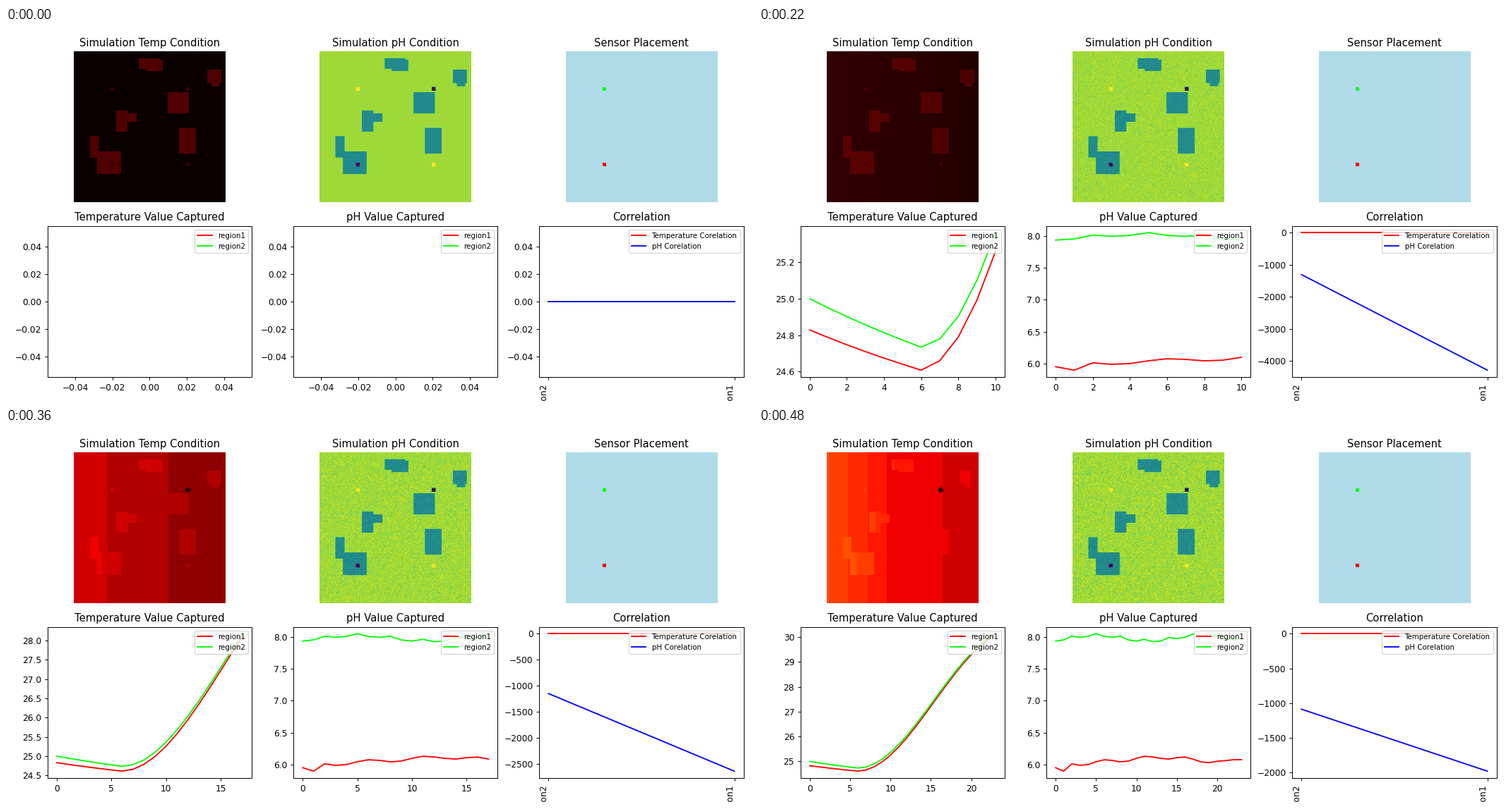
Write a matplotlib script that moves like this. It is 1058 by 529 pixels and loops after 500 ms.

```python
import numpy as np
import matplotlib.pyplot as plt
from matplotlib.animation import FuncAnimation

W, H = 1058, 529
STEPS, N = 25, 200
AIR, KEEP = 24, 0.95
hours = np.arange(STEPS)

# Disturbed areas: x0, x1, y0, y1 in cells
PATCHES = [(86, 113, 10, 24), (95, 117, 12, 27), (176, 194, 25, 43),
           (181, 192, 43, 47), (124, 152, 55, 83), (56, 71, 79, 107),
           (71, 83, 83, 94), (139, 161, 102, 136), (21, 33, 113, 141),
           (31, 62, 133, 163)]


def dot(x, y):
    return np.s_[y - 2:y + 3, x - 2:x + 3]


def wave(period, peak):
    return np.cos(2 * np.pi * (hours - peak) / period)


def solar_rise():
    """Warming above the air base at full exposure, one value per step."""
    sun = 14 * np.sin(np.pi * np.maximum(hours - 6, 0) / 24)
    rise = [0.0]
    for s in sun[1:]:
        rise.append(KEEP * rise[-1] + (1 - KEEP) * s)
    return np.array(rise)


RISE = solar_rise()
DECAY = KEEP ** hours
TEMP1 = AIR + 0.828 * DECAY + 0.9 * RISE
TEMP2 = AIR + 0.9985 * DECAY + 0.9 * RISE

PH1 = np.interp(hours, [0, 1, 2, 13, 21, 23],
                [5.94, 5.865, 6.0, 6.12, 6.03, 6.1]) + 0.03 * wave(5, 1)
PH2 = 7.982 + 0.045 * wave(13, 5) + 0.025 * wave(3, 2)

excess = np.zeros((N, N))
acid = np.full((N, N), 6 / 7)
for x0, x1, y0, y1 in PATCHES:
    excess[y0:y1, x0:x1] = 1.5
    acid[y0:y1, x0:x1] = 0.48
for x in (50, 150):
    for y in (50, 150):
        excess[dot(x, y)] = 1
        acid[dot(x, y)] = x == y

exposure = 1 - 0.4 * np.arange(N) / N
yy, xx = np.mgrid[:N, :N]
sink = np.exp(-(np.hypot(xx - 150, yy - 50) / 3.5) ** 4)

rng = np.random.default_rng(4)
drift = rng.normal(0, 0.0095, (STEPS, N, N))
drift[0] = 0
noise = np.cumsum(drift, axis=0)


def heat_image(k):
    """Hot colours: smooth dark reds, then bands of red and of orange."""
    n = max(k - 1, 0)
    above = excess * DECAY[n] + RISE[n] * exposure
    if k:
        above = above * (1 - sink)
    s = 10 + 47.8 * above
    red = 112 + 32 * np.clip((s - 94.7) // 32.6, 0, 4)
    orange = 276 + 20 * ((s - 271) // 15.6)
    tone = np.select([s < 94.7, s < 271], [s, red], orange)
    rgb = np.zeros((N, N, 3), np.uint8)
    rgb[..., 0] = np.minimum(tone, 255)
    rgb[..., 1] = np.maximum(tone - 255, 0)
    return rgb


def correlation(k):
    if k == 0:
        return 0, 0
    return -900 - 4500 / k, -47500 * (1 - np.exp(-k / 2.2)) / k


fig = plt.figure(figsize=(12, 6), dpi=W / 12, facecolor="white")


def panel(col, top):
    left, w, h = 58.7 + 348.25 * col, 289.5, 214.5
    return fig.add_axes((left / W, 1 - (top + h) / H, w / W, h / H))


maps = [panel(c, 33.0) for c in range(3)]
temp_ax, ph_ax, corr_ax = [panel(c, 280.5) for c in range(3)]

for ax, title in zip(maps, ("Simulation Temp Condition",
                            "Simulation pH Condition", "Sensor Placement")):
    ax.set_title(title)
    ax.axis("off")

sensors = np.full((N, N, 3), (175, 219, 232), np.uint8)
sensors[dot(50, 50)] = (0, 255, 0)
sensors[dot(50, 150)] = (255, 0, 0)

heat = maps[0].imshow(heat_image(0), interpolation="nearest")
ph = maps[1].imshow(acid, cmap="viridis", vmin=0, vmax=1)
maps[2].imshow(sensors, interpolation="nearest")


def chart(ax, title, lines):
    ax.cla()
    for xs, ys, color, label in lines:
        ax.plot(xs, ys, color=color, label=label)
    ax.set_title(title)
    ax.legend(loc="upper right", fontsize="small")


def regions(ax, title, first, second, k):
    chart(ax, title, [(hours[:k], first[:k], "red", "region1"),
                      (hours[:k], second[:k], "lime", "region2")])


def update(k):
    heat.set_data(heat_image(k))
    ph.set_data(np.clip(acid + noise[k], 0, 1))
    regions(temp_ax, "Temperature Value Captured", TEMP1, TEMP2, k)
    regions(ph_ax, "pH Value Captured", PH1, PH2, k)
    chart(corr_ax, "Correlation",
          [((0, 1), (0, 0), "red", "Temperature Corelation"),
           ((0, 1), correlation(k), "blue", "pH Corelation")])
    corr_ax.set_xticks((0, 1), ("region2", "region1"), rotation=90, ha="right")
    return []


# x == y marks the wrong diagonal of the pH sources, so mirror the dots
for x in (50, 150):
    acid[dot(x, 50)] = x == 50
    acid[dot(x, 150)] = x == 150

anim = FuncAnimation(fig, update, frames=STEPS, interval=20,
                     init_func=lambda: [], repeat=True, repeat_delay=0)
plt.show()
```
